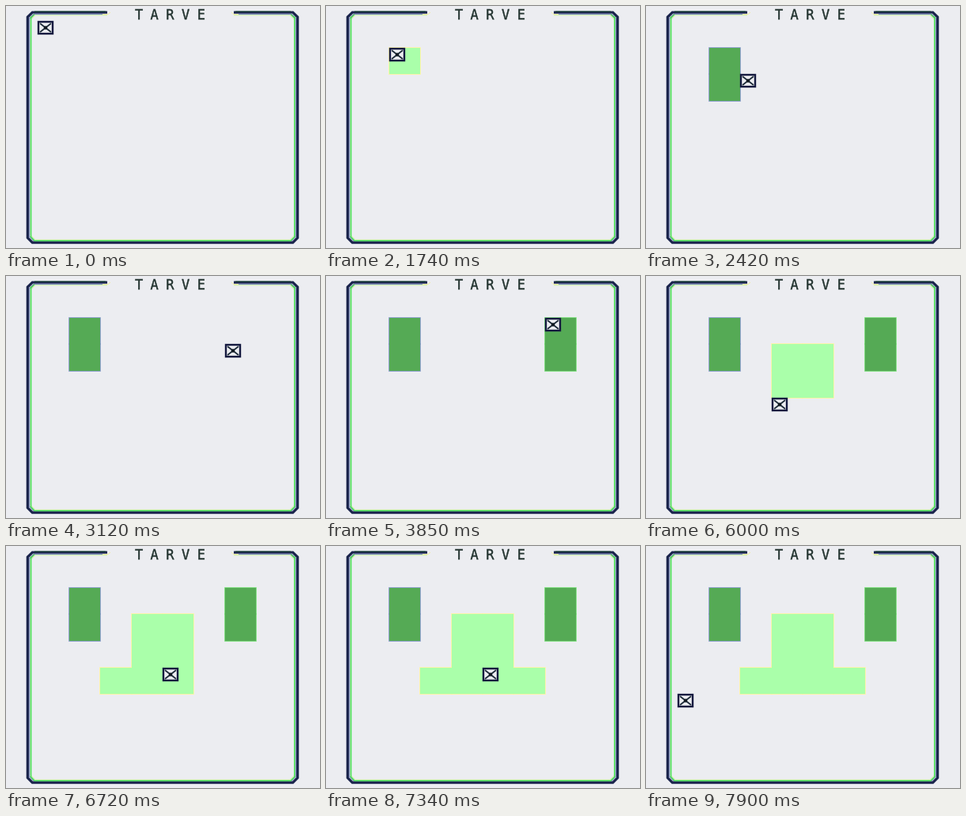
Animation, 397 px wide and 306 px high, one loop 8000 ms. Source, as an HTML page:

```html
<!DOCTYPE html>
<html lang="en">
<head>
<meta charset="utf-8">
<title>Tarve</title>
<style>
  html, body { margin: 0; width: 100%; height: 100%; overflow: hidden; background: #ecedf1; }
  svg { display: block; width: 397px; height: 306px; }
  text {
    font: 17px "DejaVu Sans Mono", monospace; letter-spacing: 9.45px;
    fill: #22332f; stroke: #22332f; stroke-width: .4px;
  }
</style>
</head>
<body>
<svg viewBox="0 0 397 306" fill="none">
  <g id="frame"></g>
  <text x="162.9" y="17">TARVE</text>
  <g id="edges"></g>
  <g id="fills" shape-rendering="crispEdges"></g>
  <g id="cursor">
    <rect x="1" y="1" width="18" height="15" fill="#ecedf1" stroke="#14193f" stroke-width="2.4"/>
    <path d="M3 3L17 14M17 3L3 14" stroke="#1c2a38" stroke-width="1.7"/>
    <circle cx="10" cy="8.5" r="2.2" fill="#101820"/>
  </g>
</svg>
<script>
const LOOP = 8000;
// U D L R move the cursor, p lays a light tile, d turns it dark.
const steps = (
  '610D 790R 1740p 1840d 2020D 2190p 2300d 2410R 2520R 2630R 2880R 3120R ' +
  '3280p 3400d 3610U 3730p 3850d 4070L 4180L 4290L 4440D 4780p 4900R 5020p ' +
  '5180D 5440p 5600L 5700p 6000D 6120L 6270p 6390R 6500p 6640R 6720p 6920R ' +
  '7060p 7340L 7440L 7540L 7650L 7750L 7900D'
).split(' ').map(s => ({ time: parseInt(s), key: s.slice(-1) }));
const moves = { U: [0, -1], D: [0, 1], L: [-1, 0], R: [1, 0] };

const byId = id => document.getElementById(id);
const colX = col => Math.round(40.4 + 39.4 * col);
const rowY = row => Math.round(19 + 33.65 * row);

// Border outline with a gap for the title, shrunk by an inset.
function border(inset, color, width) {
  const l = 27.3 + inset, t = 8 + inset, r = 368.7 - inset, b = 299.2 - inset, cut = 6;
  return `<path d="M128 ${t}H${l + cut}L${l} ${t + cut}V${b - cut}L${l + cut} ${b}` +
    `H${r - cut}L${r} ${b - cut}V${t + cut}L${r - cut} ${t}H288" stroke="${color}" stroke-width="${width}"/>`;
}

byId('frame').innerHTML =
  border(3.6, '#d5f2b4', 1.2) +
  border(2.1, '#7f90bd', 1.8) +
  border(0, '#1a234c', 3.2) +
  '<path d="M31.6 13V292L36 296.7H360L364.8 292V13" stroke="#4fe35b" stroke-width="1.6"/>' +
  '<path d="M31.6 15L36 10.5M364.8 15L360 10.5" stroke="#4fc95b" stroke-width="1.4"/>' +
  '<path d="M36 7H126M290 7H360" stroke="#174a2a"/>' +
  '<path d="M122 10.5H129L132 8M285 8L288 10.5H294" stroke="#f4efa0"/>';

function tileRect({ col, row, dark }, isEdge) {
  const x = colX(col), y = rowY(row);
  const edge = !dark ? '#fff59a' : col < 4 ? '#7f93c8' : '#6fdc6f';
  const paint = isEdge ? `stroke="${edge}" stroke-width="1.6"` : `fill="${dark ? '#55aa55' : '#aaffaa'}"`;
  return `<rect x="${x}" y="${y}" width="${colX(col + 1) - x}" height="${rowY(row + 1) - y}" ${paint}/>`;
}

function stateAt(time) {
  let col = 0, row = 0;
  const tiles = new Map();
  for (const { time: at, key } of steps) {
    if (at > time) break;
    if (moves[key]) {
      col += moves[key][0];
      row += moves[key][1];
    } else {
      tiles.set(`${col},${row}`, { col, row, dark: key === 'd' });
    }
  }
  return { col, row, tiles: [...tiles.values()] };
}

function draw(time) {
  const { col, row, tiles } = stateAt(time);
  byId('edges').innerHTML = tiles.map(tile => tileRect(tile, true)).join('');
  byId('fills').innerHTML = tiles.map(tile => tileRect(tile, false)).join('');
  byId('cursor').setAttribute('transform', `translate(${colX(col)} ${rowY(row)})`);
}

const start = performance.now();
function tick() {
  draw((performance.now() - start) % LOOP);
  requestAnimationFrame(tick);
}
tick();
</script>
</body>
</html>
```
